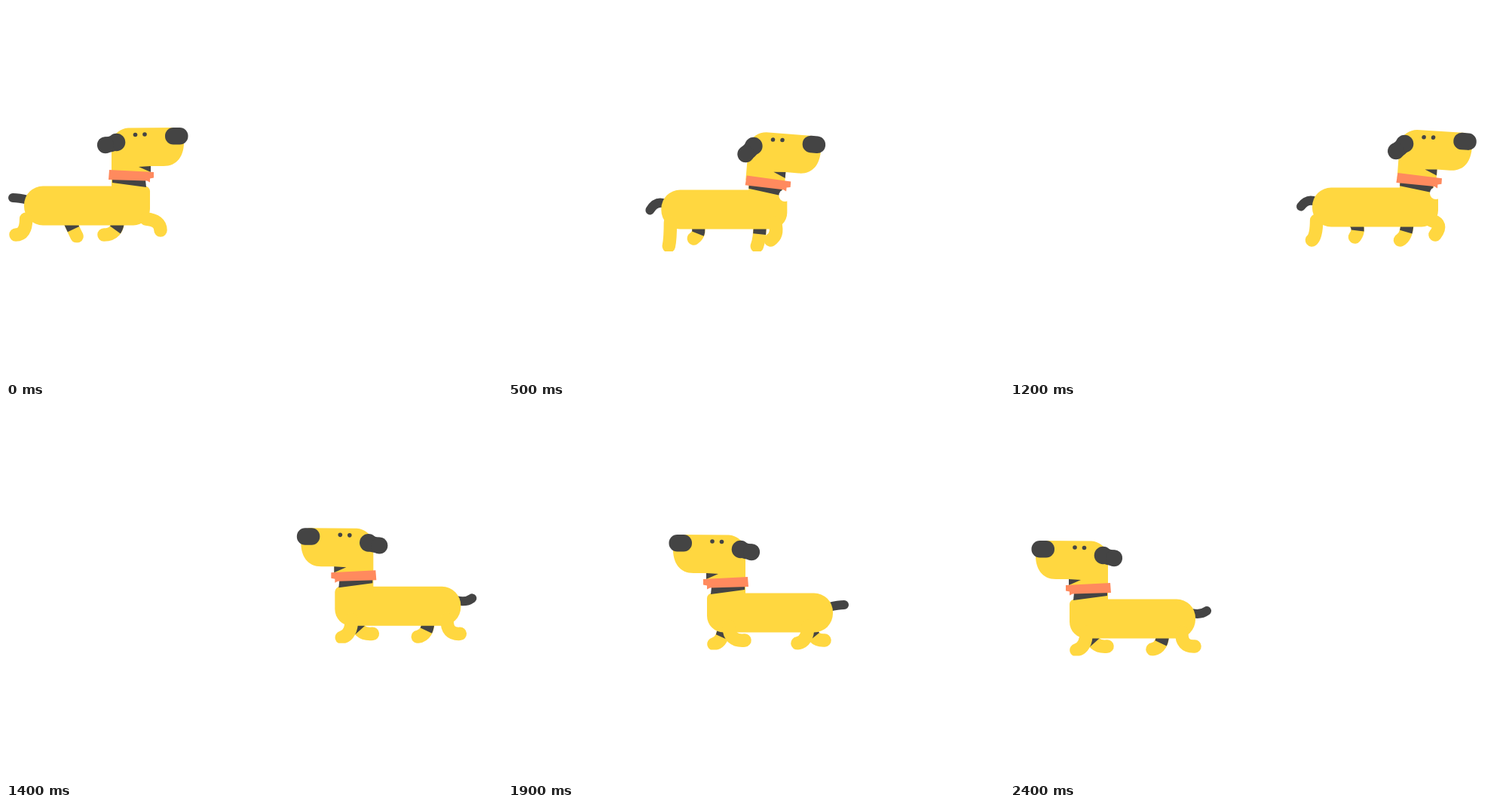
Write an HTML page with a canvas that moves like this. It is 658x494 px and loops after 2.5 s.

```html
<!DOCTYPE html>
<html lang="en">
<head>
<meta charset="utf-8">
<title>Walking dog</title>
<style>
  html, body { margin: 0; width: 100%; height: 100%; overflow: hidden; background: #fff; }
  canvas { display: block; }
</style>
</head>
<body>
<canvas id="stage" width="658" height="494"></canvas>
<script>
const ctx = document.getElementById('stage').getContext('2d');
const YELLOW = '#ffd740', DARK = '#444444', ORANGE = '#ff8a5e', WHITE = '#ffffff';
const STEP = 100, STEPS = 25, TURN = 13;
const CYCLE = 10;   // poses in one walk cycle
const STRIDE = 3;   // poses passed per step

// Walk across the stage: step, chest x, back y.
const route = [
  [0, 191, 239], [3, 303, 248], [6, 404, 242], [8, 443, 240], [12, 568, 241],
  [TURN, 467, 241], [16, 375, 233], [18, 305, 247], [19, 264, 247], [24, 79, 255]
];

// Dog space: chest at x = 0, back at y = 0, facing right.
// Foot path: pose, x, y. The hip follows the foot around `mid`.
const front = {
  mid: -24, pull: 0.3, sway: 9, reach: 20, reachAt: 2.7, farShift: 0,
  path: [[0, -50, 62], [1, -22, 66], [3, 14, 58], [5, -9, 67], [6, -40, 74], [8, -61, 64], [10, -50, 62]]
};
const rear = {
  mid: -140, pull: 0.45, sway: -9, reach: 10, reachAt: 7, farShift: 10,
  path: [[0, -120, 66], [1, -157, 74], [3, -178, 64], [5, -166, 62], [6, -134, 64], [8, -107, 66], [10, -120, 66]]
};

const wave = (t, period) => Math.cos(t / period * Math.PI * 2);

function along(keys, t) {
  const i = Math.max(1, keys.findIndex(k => k[0] >= t));
  const [t0, x0, y0] = keys[i - 1], [t1, x1, y1] = keys[i];
  const u = (t - t0) / (t1 - t0);
  return [x0 + (x1 - x0) * u, y0 + (y1 - y0) * u];
}

function fill(color, draw) {
  ctx.beginPath();
  draw();
  ctx.fillStyle = color;
  ctx.fill();
}

function poly(color, ...pts) {
  fill(color, () => {
    for (let i = 0; i < pts.length; i += 2) ctx.lineTo(pts[i], pts[i + 1]);
    ctx.closePath();
  });
}

function disc(color, x, y, r) {
  fill(color, () => ctx.arc(x, y, r, 0, Math.PI * 2));
}

function curve(color, width, x0, y0, x1, y1, x2, y2) {
  ctx.beginPath();
  ctx.moveTo(x0, y0);
  ctx.quadraticCurveTo(x1, y1, x2, y2);
  ctx.strokeStyle = color;
  ctx.lineWidth = width;
  ctx.stroke();
}

function tilted(x, y, degrees, draw) {
  ctx.save();
  ctx.translate(x, y);
  ctx.rotate(degrees * Math.PI / 180);
  ctx.translate(-x, -y);
  draw();
  ctx.restore();
}

function leg(limb, pose, isFar) {
  const p = isFar ? (pose + CYCLE / 2) % CYCLE : pose;
  const [footX, footY] = along(limb.path, p);
  const hipX = limb.mid + limb.pull * (footX - limb.mid) + limb.sway * wave(p - 2, CYCLE);
  const lead = limb.reach * Math.max(0, wave(p - limb.reachAt, CYCLE)) ** 2;
  const shape = [hipX, 43, hipX + lead, 64 - lead, footX, footY];
  ctx.save();
  ctx.lineCap = 'round';
  if (isFar) ctx.translate(limb.farShift, 0);
  curve(YELLOW, 17.5, ...shape);
  if (isFar) {
    // Shadow on the upper part of the leg.
    ctx.lineCap = 'butt';
    ctx.setLineDash([15, 200]);
    curve(DARK, 17, ...shape);
  }
  ctx.restore();
}

function legs(pose, isFar, ground) {
  ctx.save();
  ctx.beginPath();
  ctx.rect(-220, 0, 300, ground);
  ctx.clip();
  leg(rear, pose, isFar);
  leg(front, pose, isFar);
  ctx.restore();
}

function face() {
  fill(YELLOW, () => {
    ctx.moveTo(-51, -12);
    ctx.lineTo(-51, -60);
    ctx.quadraticCurveTo(-45, -76, -29, -77.5);
    ctx.lineTo(35, -78);
    ctx.lineTo(45, -62);
    ctx.bezierCurveTo(46, -40, 36, -27, 18, -27);
    ctx.lineTo(1, -27);
    ctx.lineTo(1, -12);
  });
  poly(DARK, -15, -26, 1, -27, 1, -19);
  fill(DARK, () => ctx.roundRect(20, -78, 30.5, 22.5, 11));
  disc(DARK, -19.5, -68.5, 2.8);
  disc(DARK, -7, -69, 2.8);
}

function ear(nod) {
  const angle = (14 + 36 * nod) * Math.PI / 180;
  const x = -44.5, y = -58.5;
  const tipX = x - 15 * Math.cos(angle), tipY = y + 15 * Math.sin(angle);
  ctx.lineCap = 'round';
  curve(DARK, 21, x, y, (x + tipX) / 2, (y + tipY) / 2 + 1, tipX, tipY);
  disc(DARK, x, y, 11.8);
  disc(DARK, tipX, tipY, 11);
}

function dog(pose) {
  // The head dips twice per cycle; ear, tail and collar follow it.
  const nod = Math.max(0, wave(pose - 1.4, CYCLE / 2));
  const tilt = 5.6 * nod;
  const ground = nod ? 81 : 74.5;

  legs(pose, true, ground);
  ctx.lineCap = 'round';
  curve(DARK, 12, -182, 15 + 13 * nod, -174, 18 - 5 * wave(pose - 1.5, CYCLE), -162, 18);
  fill(YELLOW, () => ctx.roundRect(-167, -0.5, 167, 52, [25, 7, 22, 25]));
  legs(pose, false, ground);

  fill(YELLOW, () => ctx.rect(-51, -12, 45, 20));
  tilted(-36, -60, tilt, face);
  ear(nod);
  tilted(-83, -16, tilt, () => poly(DARK, -50, -11, -6, -9, -5, 1, -50, -5));
  if (nod) disc(WHITE, -3, 7, 8);
  tilted(-83, -16, tilt, () =>
    poly(ORANGE, -54, -22, 5, -19, 5, -11.5, 0, -10.5, 0, -5.5, -4, -7.5, -55, -9));
}

function render() {
  const n = Math.floor(performance.now() / STEP) % STEPS;
  const left = n >= TURN;
  // The turn holds its pose, and the first step lasts two strides.
  const strides = left ? n - 1 : n || -1;
  const pose = (STRIDE * (strides + 2)) % CYCLE;
  ctx.setTransform(1, 0, 0, 1, 0, 0);
  ctx.fillStyle = WHITE;
  ctx.fillRect(0, 0, 658, 494);
  ctx.translate(...along(route, n));
  if (left) ctx.scale(-1, 1);
  dog(pose);
  requestAnimationFrame(render);
}
render();
</script>
</body>
</html>
```
